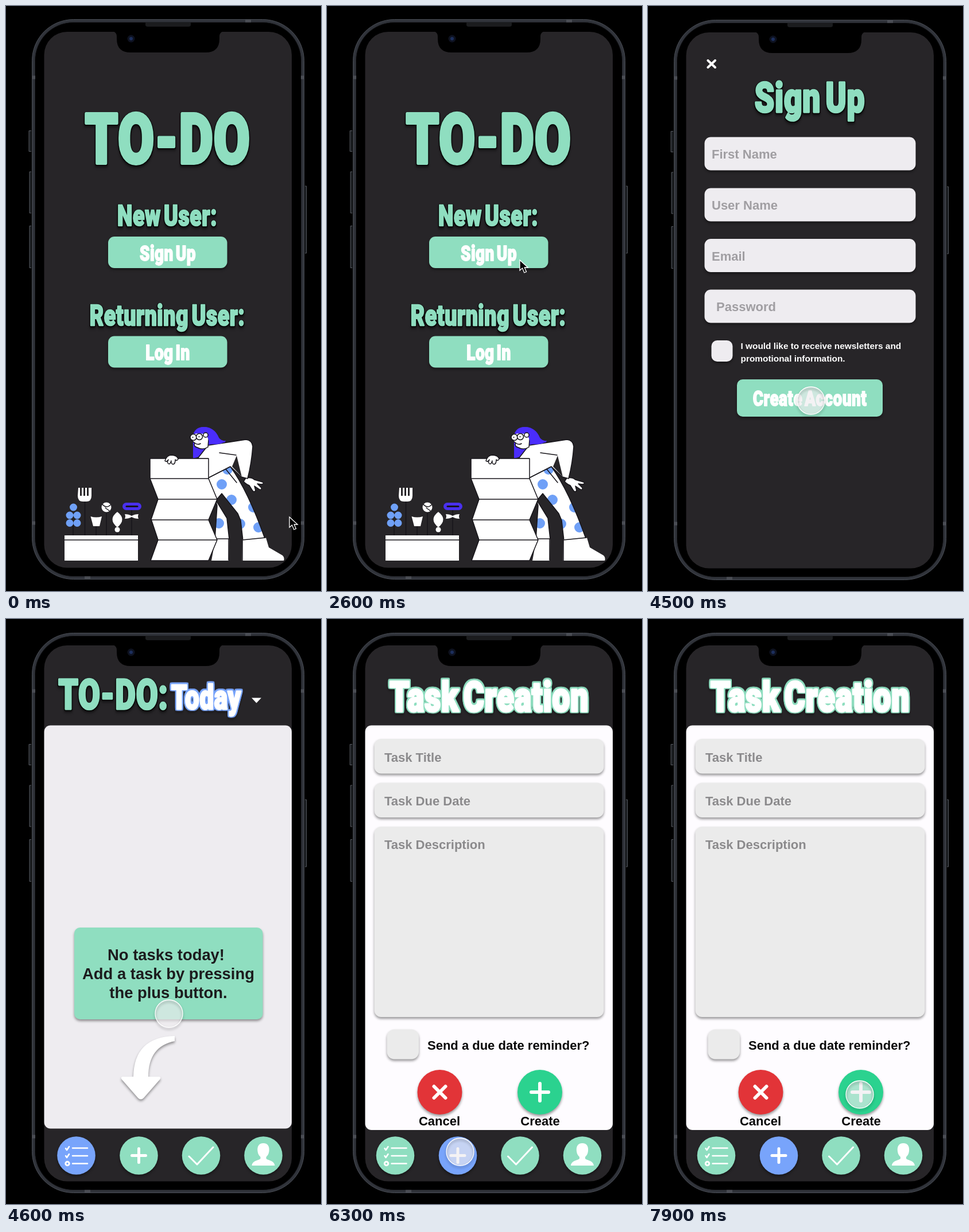
These frames come from a looping animation (549 px wide and 1020 px high, 8 s). An HTML page:

```html
<!DOCTYPE html>
<html lang="en">
<head>
<meta charset="utf-8">
<title>To-do app walkthrough</title>
<style>
  html, body { margin: 0; width: 100%; height: 100%; overflow: hidden; background: #000; }
  svg { display: block; width: 549px; height: 1020px; }
  text { font: bold 22px "Liberation Sans", Arial, sans-serif; }

  .mint { fill: #8fdec0; }
  .white { fill: #fff; }
  .field { fill: #eeecf0; }
  .soft { fill: #ebebeb; }
  .hint { fill: #a09ea2; }
  .raised { filter: drop-shadow(0 3px 2px #0006); }
  .line { fill: none; stroke: #fff; stroke-width: 3; stroke-linecap: round; stroke-linejoin: round; }
  .ink { stroke: #17151a; stroke-width: 1.5; stroke-linejoin: round; }
  .pen { fill: none; stroke: #17151a; stroke-width: 1.5; stroke-linecap: round; }

  /* Tall, heavy display lettering */
  .display {
    font-family: Roboto, "Open Sans", sans-serif; font-weight: 900;
    letter-spacing: .015em; word-spacing: -.12em;
    transform: scaleY(1.33); text-anchor: middle;
    stroke: currentColor; fill: currentColor; stroke-width: .05em; stroke-linejoin: round;
  }
  .outlined {
    color: #8fdec0;
    filter: drop-shadow(1px 0 0 #050505) drop-shadow(-1px 0 0 #050505)
            drop-shadow(0 1px 0 #050505) drop-shadow(0 2px 1.5px #0008);
  }
  .plain { color: #fff; }
  .edged {
    color: #fff;
    filter: drop-shadow(2px 0 0 var(--edge)) drop-shadow(-2px 0 0 var(--edge))
            drop-shadow(0 1.7px 0 var(--edge)) drop-shadow(0 -1.7px 0 var(--edge)) drop-shadow(0 2px 1.5px #0006);
  }

  .phone, .scene, .arrow, .touch { animation: 8s step-end infinite; }
  .pointer { animation: move 8s ease-in-out infinite; }
  .phone { animation-name: settle; }
  .home { animation-name: home; }
  .signup { animation-name: signup; }
  .today { animation-name: today; }
  .task { animation-name: task; }
  .arrow { animation-name: home; }
  .touch { animation-name: touch; }

  @keyframes settle { 0% { transform: translateY(-1px); } 37.4%, 100% { transform: none; } }
  @keyframes home { 0% { visibility: visible; } 37.4%, 100% { visibility: hidden; } }
  @keyframes signup { 0%, 57.4%, 100% { visibility: hidden; } 37.4% { visibility: visible; } }
  @keyframes today { 0%, 76.2%, 100% { visibility: hidden; } 57.4% { visibility: visible; } }
  @keyframes task { 0% { visibility: hidden; } 76.2%, 100% { visibility: visible; } }
  @keyframes touch { 0% { visibility: hidden; } 37.4%, 100% { visibility: visible; } }
  @keyframes move {
    0%, 12.5% { transform: translate(494px, 891px); }
    23.75%, 46.25% { transform: translate(336px, 443px); }
    53.75%, 59% { transform: translate(284px, 688px); }
    71.25% { transform: translate(316px, 851px); }
    75%, 82% { transform: translate(232px, 929px); }
    92.5% { transform: translate(356px, 845px); }
    96.25%, 100% { transform: translate(369px, 829px); }
  }
</style>
</head>
<body>
<svg viewBox="0 0 549 1020">
  <defs>
    <pattern id="dots" width="549" height="1020" patternUnits="userSpaceOnUse">
      <path fill="#fff" d="M0 0H549V1020H0z"/>
      <path fill="none" stroke="#6fa0f7" stroke-width="18" stroke-linecap="round"
        d="M386 808h0M376 834h0M393 861h0M431 874h0M371 902h0M408 903h0M440 909h0"/>
    </pattern>
    <g id="nav">
      <g class="raised">
        <circle cx="122.5" cy="935.5" r="33.3" style="fill:var(--list)"/>
        <circle cx="231.5" cy="935.5" r="33.3" style="fill:var(--add)"/>
        <circle class="mint" cx="340" cy="935.5" r="33.3"/>
        <circle class="mint" cx="448.5" cy="935.5" r="33.3"/>
      </g>
      <path class="line" style="stroke-width:2.5" d="M116 922.5h26M116 936h26M116 949.5h26M104 923l2 3 4-6M104 936l2 3 4-6"/>
      <circle class="line" cx="107" cy="949.5" r="3.2"/>
      <path class="line" style="stroke-width:5" d="M219.5 935.5h24M231.5 923.5v24"/>
      <path class="line" d="M319 937l14 14 28-30"/>
      <path class="white" d="M448.5 914c8 0 11 6 10 14-.5 5-3 8-5 10v3c3 3 14 3 15 12H428.500c1-9 12-9 15-12v-3c-2-2-4.5-5-5-10-1-8 2-14 10-14z"/>
    </g>
  </defs>

  <g class="phone">
    <g fill="#1b1e22" stroke="#565a61">
      <path d="M44 218.500h-4v36h4M44 290h-3v72h3M44 384.500h-3v73h3M521 315h2.500v117H521"/>
    </g>
    <rect x="45.500" y="24.500" width="474" height="976" rx="72" fill="#30333a" stroke="#4b4f57"/>
    <rect x="50.500" y="29.500" width="464" height="966" rx="67" fill="#000" stroke="#1c1d21"/>
    <path fill="none" stroke="#4a4d54" stroke-width="6" d="M45 125.500h6M514 125.500h6M45 902.500h6M514 902.500h6"/>
    <path fill="none" stroke="#4a4d54" stroke-width="5" d="M417 27h10M137 998h10"/>
    <rect x="66.500" y="46" width="431.500" height="934.500" rx="40" fill="#272528"/>
    <path d="M186 45h193q-7 2-7 9v4q0 24-24 24H217q-24 0-24-24v-4q0-7-7-9z"/>
    <path fill="#1b1c1e" d="M243 30h79v4q0 3-4 3h-71q-4 0-4-3z"/>
    <circle cx="218" cy="58" r="6.500" fill="#0e1220"/>
    <circle cx="218" cy="58" r="3" fill="#1c2e5c"/>
  </g>

  <g class="scene home">
    <g transform="translate(282 274)"><text class="display outlined" style="font-size:91px">TO-DO</text></g>
    <g transform="translate(281 383)"><text class="display outlined" style="font-size:37.5px">New User:</text></g>
    <g transform="translate(281 557)"><text class="display outlined" style="font-size:37.5px">Returning User:</text></g>
    <g class="mint raised">
      <rect x="178" y="402" width="207.500" height="55" rx="11"/>
      <rect x="178" y="575.500" width="207.500" height="55" rx="11"/>
    </g>
    <g transform="translate(282 444)"><text class="display plain" style="font-size:28px">Sign Up</text></g>
    <g transform="translate(282 617)"><text class="display plain" style="font-size:28px">Log In</text></g>

    <g class="planter">
      <path class="pen" d="M137.500 862v62M157 907v16M175 882v41M194 915v8M219 878v45M117 905v18"/>
      <path class="white" d="M126 840h3v14h3v-14h3v14h3v-14h3v14h3v-14h5v14q0 10-9 10h-6q-9 0-9-10zM147.500 890q9.500 3 19.500 0l-4 17h-11zM194 882q17 13 0 27-17-14 0-27zM207 886q7 0 12 3 5-3 12-3-2 4 0 8-7 0-12-3-5 3-12 3 2-4 0-8z"/>
      <circle class="white" cx="194" cy="913" r="4.500"/>
      <circle class="white" cx="175" cy="874" r="8.500"/>
      <path class="pen" d="M168 869q7 8 14 1M173 875l7 5"/>
      <path fill="none" stroke="#6fa0f7" stroke-width="13" stroke-linecap="round" d="M117.500 874h0M111 888h0M124 888h0M111 901.500h0M124 901.500h0"/>
      <rect x="203" y="866" width="33" height="13" rx="6.500" fill="#4930ee"/>
      <path class="pen" style="stroke-width:3" d="M210 872.500h19"/>
      <path class="white" d="M102 923h128v44H102z"/>
      <path class="pen" d="M102 931h128"/>
    </g>

    <g class="woman">
      <path fill="#4a2dfb" d="M326 789V748q4-15 20-14 18 1 25 19 5 6 12 5l-10 17z"/>
      <path class="ink" fill="url(#dots)" d="M352 823l39-20C414 835 434 880 451 928l-38 4-4-35-5-12-28-35-10 12 19 31 4 37-25 1 4-60z"/>
      <path class="pen" d="M381 805l21 26"/>
      <path class="white" d="M365 929h24l-1 38h-30zM412 930l41-3 5 17 24 14q4 4 2 9h-73z"/>
      <path class="pen" d="M365 929h24M412 931l40-4M388 929v37M412 931v36"/>
      <path class="white ink" d="M418 823q10-2 15 3l14 4q4 3-2 4l-7-1 7 7q1 4-3 3l-9-6 2 8q-3 4-6-1l-5-8q-7-3-10-7z"/>
      <path class="white ink" d="M334 789l18-23q34-5 66-10 11 1 12 12-2 29-9 56l-11-3-19-18-39 20V789z"/>
      <path fill="#272528" d="M402 784l-8 19 17 18z"/>
      <path class="pen" d="M372 779l29 4"/>
      <path class="white ink" d="M328 746q9-7 20-6 9 3 5 16l-1 13q-9 6-18 1-8-2-5-8l-6-5z"/>
      <path fill="#4a2dfb" d="M327 746q5-12 19-12 17 1 25 19 5 7 12 5-10 9-28 5-3-11-7-16-9-3-21-1z"/>
      <circle class="white ink" cx="348" cy="748" r="4"/>
      <circle class="white ink" cx="326.500" cy="752" r="5.500"/>
      <circle class="white ink" cx="337" cy="751" r="5.500"/>
      <path class="pen" d="M329 762q5 4 10 1M325 752h1M336 751h1"/>
    </g>

    <g class="white ink">
      <path d="M251 789h102v35l15 36-15 36 15 35-15 36h-101l13-36-12-36 12-35-14-36z"/>
      <path d="M251 824h102M265 860h103M253 896h100M265 931h103"/>
      <path d="M277 793q3-10 12-10 10 1 11 7-2 4-5 1 0 8-4 8-4-1-3-6-2 7-5 5-3-2 0-7-3 5-6 2z"/>
    </g>
  </g>

  <g class="scene signup">
    <path class="line" style="stroke-width:4" d="M104.500 95l12.500 12M117 95l-12.500 12"/>
    <g transform="translate(282 185)"><text class="display outlined" style="font-size:55px">Sign Up</text></g>
    <g class="field raised">
      <rect x="98.500" y="228.500" width="368" height="58" rx="11"/>
      <rect x="98.500" y="317.500" width="368" height="58" rx="11"/>
      <rect x="98.500" y="406" width="368" height="58" rx="11"/>
      <rect x="98.500" y="494.500" width="368" height="58" rx="11"/>
      <rect x="110.500" y="583" width="37" height="37" rx="10"/>
    </g>
    <g class="hint">
      <text x="111" y="266">First Name</text>
      <text x="111" y="355">User Name</text>
      <text x="111" y="443.500">Email</text>
      <text x="119" y="532">Password</text>
    </g>
    <g class="white">
      <text x="161.500" y="598" style="font-size:15.400px">I would like to receive newsletters and</text>
      <text x="161.500" y="620" style="font-size:15.400px">promotional information.</text>
    </g>
    <rect class="mint raised" x="155" y="651" width="254" height="65" rx="10"/>
    <g transform="translate(282 697)"><text class="display plain" style="font-size:28px">Create Account</text></g>
  </g>

  <g class="scene today" style="--list:#78a4fb;--add:#8fdec0">
    <g transform="translate(187 157)"><text class="display outlined" style="font-size:55px">TO-DO:</text></g>
    <g transform="translate(349 157)"><text class="display edged" style="font-size:44px;--edge:#78a4fb">Today</text></g>
    <path class="white" d="M428 137.500h17l-8.500 9z"/>
    <rect class="field" x="66.500" y="185.500" width="431.500" height="703" rx="11"/>
    <rect class="mint raised" x="119" y="538" width="328.500" height="160" rx="10"/>
    <g fill="#1c1b1d" text-anchor="middle">
      <text x="279" y="594.500" style="font-size:27.400px">No tasks today!</text>
      <text x="283" y="627.500" style="font-size:27.400px">Add a task by pressing</text>
      <text x="283" y="661" style="font-size:27.400px">the plus button.</text>
    </g>
    <path class="white raised" d="M294 727v9q-46 9-46 62h19q4 1 1 5l-28 32q-5 5-10 0l-28-32q-3-4 1-5h19q1-69 72-71z"/>
    <use href="#nav"/>
  </g>

  <g class="scene task" style="--list:#8fdec0;--add:#78a4fb">
    <g transform="translate(282.500 160.500)"><text class="display edged" style="font-size:55px;--edge:#8fdec0">Task Creation</text></g>
    <rect x="66.500" y="185.500" width="431.500" height="705.500" rx="11" fill="#fefcff"/>
    <g class="soft raised">
      <rect x="82.500" y="209" width="400" height="60.500" rx="12"/>
      <rect x="82.500" y="285.500" width="400" height="60.500" rx="12"/>
      <rect x="82.500" y="362" width="400" height="332" rx="12"/>
      <rect x="104.500" y="715.500" width="55.500" height="52" rx="13"/>
    </g>
    <g fill="#8b8a8c">
      <text x="100" y="248.500">Task Title</text>
      <text x="100" y="325">Task Due Date</text>
      <text x="100" y="400.500">Task Description</text>
    </g>
    <g fill="#080808">
      <text x="175" y="750.500">Send a due date reminder?</text>
      <text x="196" y="883" text-anchor="middle">Cancel</text>
      <text x="371.500" y="883" text-anchor="middle">Create</text>
    </g>
    <g class="raised">
      <circle cx="196.500" cy="825" r="39" fill="#e23438"/>
      <circle cx="371" cy="825" r="39" fill="#2bd28f"/>
    </g>
    <path class="line" style="stroke-width:6" d="M186.500 815l20 20M206.500 815l-20 20M356 825h30M371 810v30"/>
    <use href="#nav" x="-3.500"/>
  </g>

  <g class="pointer">
    <path class="arrow" d="M0 0v18l4.500-4 3.300 8 3.700-1.600-3.300-7.400h6z" stroke="#fff" stroke-width="1.300"/>
    <g class="touch">
      <circle r="24" fill="#eeecef" fill-opacity=".66"/>
      <circle class="raised" r="24" fill="none" stroke="#fff" stroke-width="1.300"/>
    </g>
  </g>
</svg>
</body>
</html>
```
